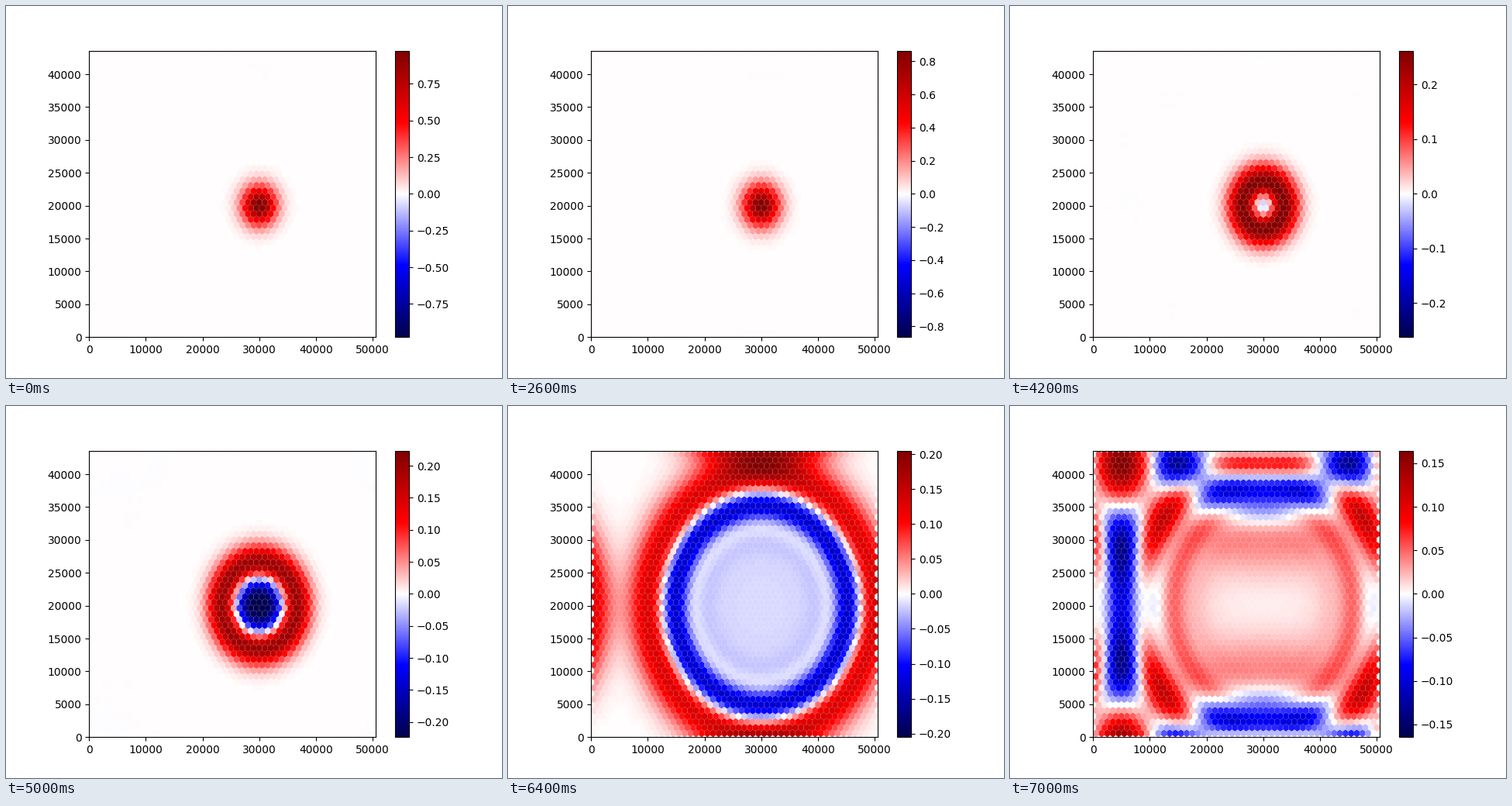
Write a matplotlib script that moves like this. It is 640x480 px and loops after 7.2 s.

```python
import numpy as np
import matplotlib.pyplot as plt
from matplotlib.animation import FuncAnimation
from matplotlib.collections import PolyCollection

# Periodic hexagonal mesh, lengths in metres
N = 50
DX = 1000.0
DY = DX * np.sqrt(3) / 2
RADIUS = DX / np.sqrt(3)
WIDTH, HEIGHT = N * DX, N * DY

# Initial bump
X0, Y0, BUMP = 30000.0, 20050.0, 2950.0

# Distance the wave has run, and the colour limit, at a few steps
STEPS = 35
KEYS = [0, 7, 16, 24, 28, 31, 34]
REACH = [90, 302, 1404, 5680, 12350, 20000, 35400]
LIMITS = [0.9767, 0.9573, 0.5957, 0.2235, 0.1476, 0.2049, 0.1645]
LAG = 0.31  # slows short waves when the time step is long


def wrap(d, period):
    return (d + period / 2) % period - period / 2


def wave_fields():
    """Heights on the hexagon centres for every step, shape (STEPS, N * N)."""
    x = DX / 2 + DX / 2 * np.arange(2 * N)
    y = RADIUS + DY * np.arange(N)
    r2 = wrap(x - X0, WIDTH)[None, :] ** 2 + wrap(y - Y0, HEIGHT)[:, None] ** 2
    spectrum = np.fft.fft2(np.exp(-r2 / BUMP ** 2))
    kx = 2 * np.pi * np.fft.fftfreq(2 * N, DX / 2)
    ky = 2 * np.pi * np.fft.fftfreq(N, DY)
    k = np.hypot(kx[None, :], ky[:, None])

    rows = np.arange(N)[:, None]
    cols = 2 * np.arange(N)[None, :] + rows % 2
    reach = np.exp(np.interp(np.arange(STEPS), KEYS, np.log(REACH)))
    phase = np.zeros_like(k)
    fields = []
    for run in np.diff(reach, prepend=0):
        phase += np.arctan(LAG * k * run) / LAG
        height = np.fft.ifft2(spectrum * np.cos(phase)).real
        fields.append(height[rows, cols].ravel())
    fields = np.array(fields)

    peaks = np.abs(fields).max(axis=1)
    gain = np.interp(np.arange(STEPS), KEYS, np.array(LIMITS) / peaks[KEYS])
    return fields * gain[:, None]


def hexagons():
    angles = np.pi / 6 + np.pi / 3 * np.arange(6)
    corners = RADIUS * np.column_stack([np.cos(angles), np.sin(angles)])
    row, col = np.divmod(np.arange(N * N), N)
    centres = np.column_stack([DX * (col + 0.5 + 0.5 * (row % 2)),
                               RADIUS + DY * row])
    return centres[:, None, :] + corners


fields = wave_fields()

fig, ax = plt.subplots(figsize=(6.4, 4.8), dpi=100)
ax.set_box_aspect(1)
ax.set_xlim(0, WIDTH + DX / 2)
ax.set_ylim(0, (N - 1) * DY + 2 * RADIUS)

cells = PolyCollection(hexagons(), cmap="seismic")
cells.set_array(fields[0])
cells.set_clim(-LIMITS[0], LIMITS[0])
ax.add_collection(cells, autolim=False)
fig.colorbar(cells, ax=ax)


def update(frame):
    # the first state is held for two frames
    field = fields[max(frame - 1, 0)]
    limit = np.abs(field).max()
    cells.set_array(field)
    cells.set_clim(-limit, limit)
    return [cells]


anim = FuncAnimation(fig, update, frames=STEPS + 1, interval=200,
                     repeat=True, repeat_delay=0, blit=False)
plt.show()
```
